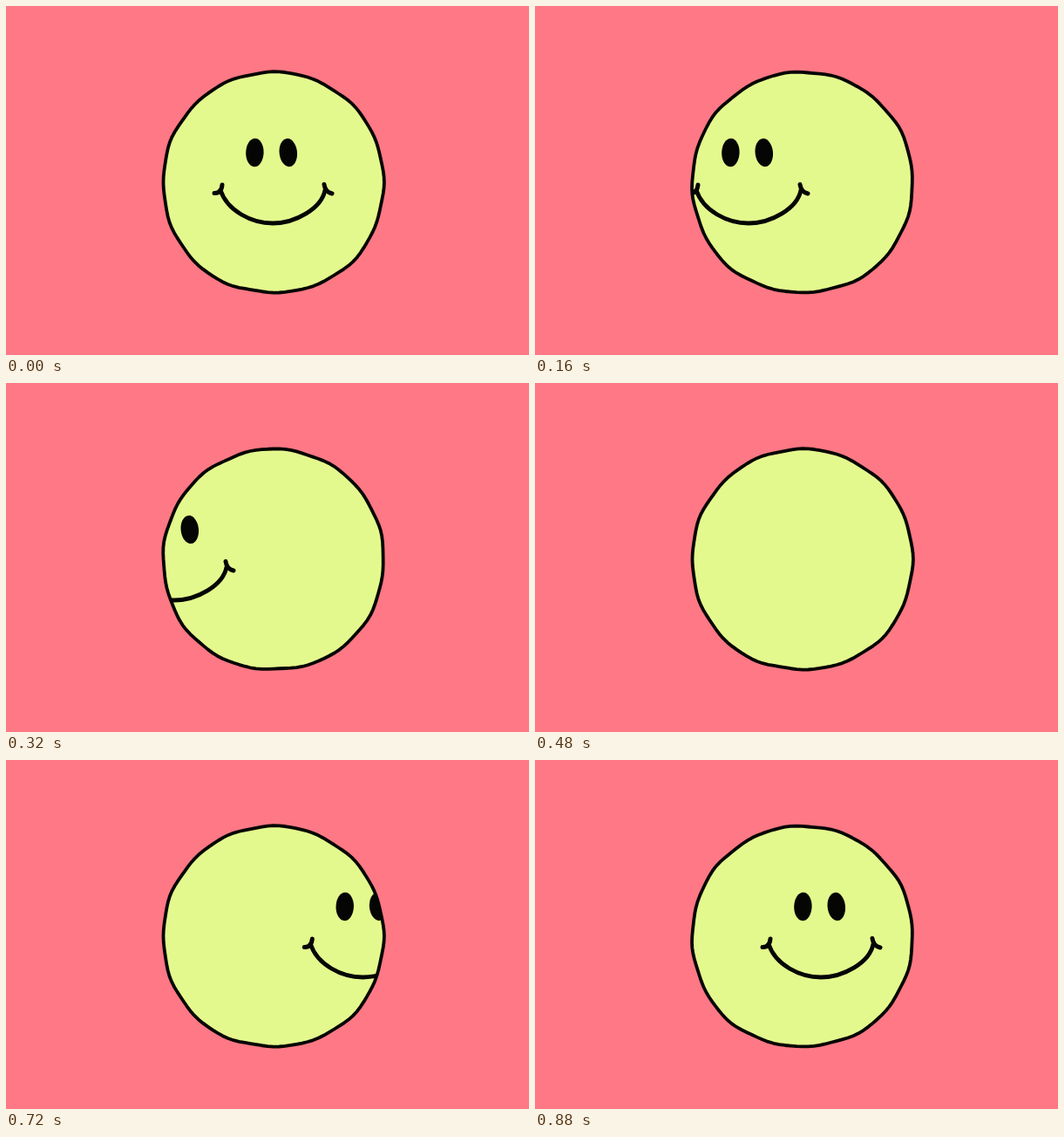
Animation of 600 by 400 pixels, one loop 960 ms. Source, as an HTML page with a canvas:

```html
<!DOCTYPE html>
<html lang="en">
<head>
<meta charset="utf-8">
<title>Turning smiley</title>
<style>
  html, body { margin: 0; width: 100%; height: 100%; overflow: hidden; background: #ff7885; }
  canvas { display: block; }
</style>
</head>
<body>
<canvas id="stage" width="600" height="400"></canvas>
<script>
const ctx = document.getElementById('stage').getContext('2d');
const STEP = 80, STEPS = 12, VARIANTS = 3;
const CX = 306.8, CY = 201.9, R = 126.3;
const INK = '#050504';

// The face leaves on the left, passes behind the ball and returns on the right
const turn = [[0, 0], [2, -61], [4, -113], [6, -200], [7, 194], [10, 58], [11, 22]];

function shiftAt(step) {
  const next = turn.findIndex(([at]) => at >= step);
  const [toStep, to] = turn[next];
  if (toStep === step) return to;
  const [fromStep, from] = turn[next - 1];
  return from + (to - from) * (step - fromStep) / (toStep - fromStep);
}

// Circle with fuller lower cheeks and a slight hand-drawn wobble
function makeOutline(variant) {
  const path = new Path2D();
  for (let degree = 0; degree < 360; degree += 3) {
    const a = degree * Math.PI / 180;
    const cheeks = 1.2 * Math.sin(2 * a) ** 2 * (1 + Math.sin(a));
    const wobble = .4 * Math.cos(9 * a + 2 * variant) + .4 * Math.cos(16 * a + 4 * variant);
    const radius = R + cheeks + wobble;
    path.lineTo(CX + radius * Math.cos(a), CY + radius * Math.sin(a));
  }
  path.closePath();
  return path;
}

const outlines = Array.from({ length: VARIANTS }, (_, variant) => makeOutline(variant));
const smile = new Path2D('M246 211C254 235 282 249 306 249C332 249 362 232 366 211');
const curls = new Path2D('M248 205Q247 215 239 214.5M365 204.5Q366 213 374 215');

function stroke(path, width) {
  ctx.lineWidth = width;
  ctx.stroke(path);
}

function drawEye(x, tilt) {
  ctx.beginPath();
  ctx.ellipse(x, 168, 10.2, 16.2, tilt, 0, Math.PI * 2);
  ctx.fill();
}

function drawFace(shift) {
  ctx.translate(shift, 0);
  ctx.fillStyle = INK;
  drawEye(285.4, .03);
  drawEye(323.8, -.1);
  stroke(smile, 4.8);
  stroke(curls, 5);
}

function draw(time) {
  const step = Math.floor(time / STEP) % STEPS;
  const outline = outlines[step % VARIANTS];
  ctx.fillStyle = '#ff7885';
  ctx.fillRect(0, 0, 600, 400);
  ctx.strokeStyle = INK;
  ctx.lineCap = ctx.lineJoin = 'round';
  ctx.fillStyle = '#e4f98d';
  ctx.fill(outline);
  ctx.save();
  ctx.clip(outline);
  drawFace(shiftAt(step));
  ctx.restore();
  stroke(outline, 3.8);
}

let start;
function tick(now) {
  start ??= now;
  draw(now - start);
  requestAnimationFrame(tick);
}
draw(0);
requestAnimationFrame(tick);
</script>
</body>
</html>
```
